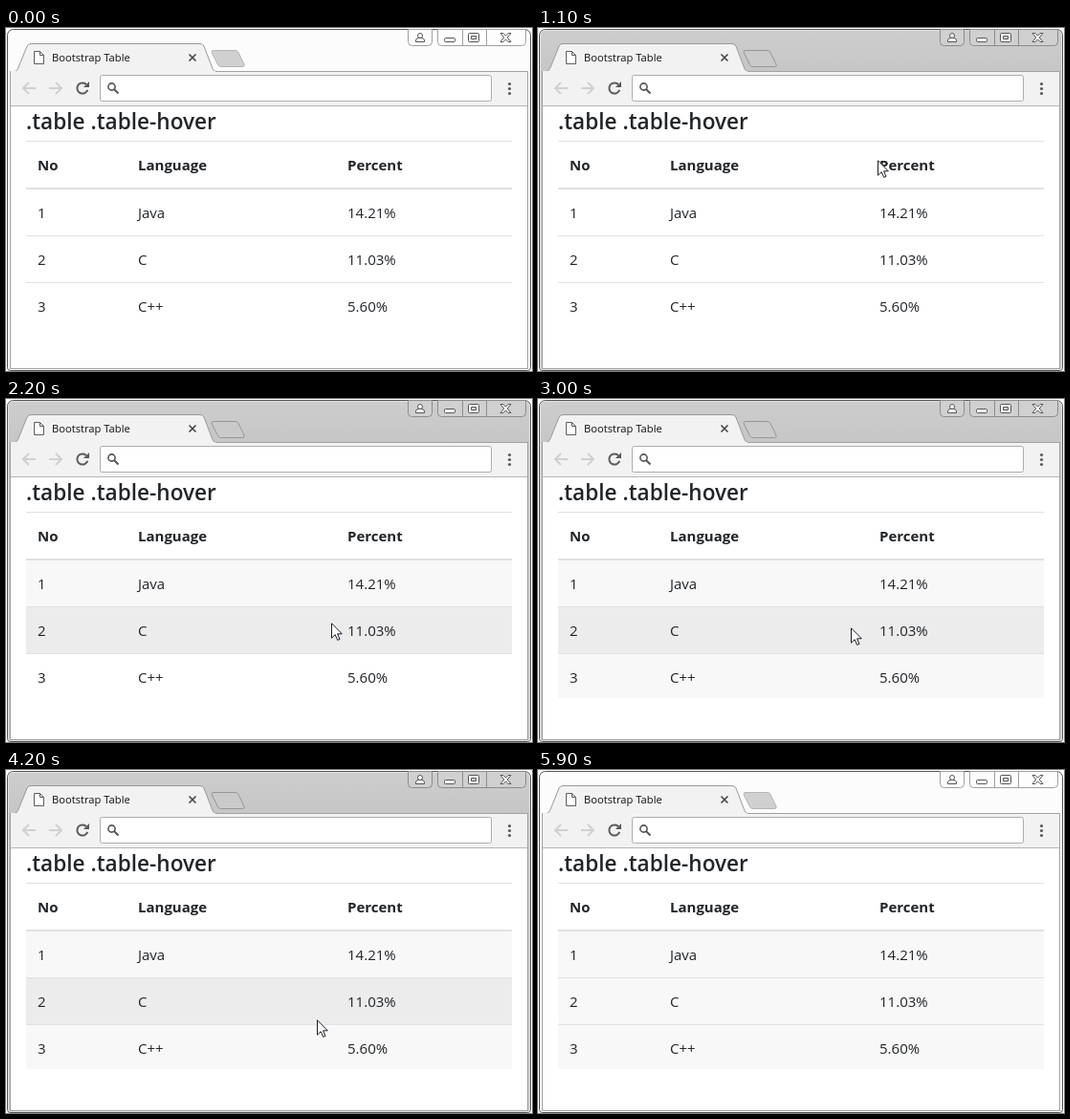
Write an HTML page with a canvas that moves like this. It is 550 px wide and 359 px high and loops after 6000 ms.

```html
<!DOCTYPE html>
<html lang="en">
<head>
<meta charset="utf-8">
<title>Bootstrap Table</title>
<style>
  html, body { margin: 0; width: 100%; height: 100%; overflow: hidden; background: #fff; }
  canvas { display: block; }
</style>
</head>
<body>
<canvas id="stage" width="550" height="359"></canvas>
<script>
const ctx = document.getElementById('stage').getContext('2d');
const LOOP = 6000, STEP = 100, EXIT = 4800;
const FONT = '"Open Sans", "Noto Sans", sans-serif';
const INK = '#212529';

// Pointer poses: time, x, y
const POSES = [
  [400, 490, 86], [500, 401, 122], [600, 372, 132], [700, 358, 137], [800, 355, 138],
  [1600, 355, 138], [1800, 354, 149], [2000, 347, 188], [2200, 340, 234], [2300, 338, 261],
  [2400, 337, 285], [2500, 336, 303], [2600, 335, 310], [2700, 335, 310], [2800, 334, 299],
  [2900, 331, 271], [3000, 327, 239], [3200, 325, 180], [3300, 325, 150], [3400, 325, 134],
  [3500, 325, 126], [3600, 325, 126], [3700, 325, 130], [3900, 325, 160], [4300, 325, 294],
  [4400, 325, 312], [4700, 325, 354]
];

const COLS = [33, 138, 357];
const HEAD = ['No', 'Language', 'Percent'];
const ROWS = [['1', 'Java', '14.21%'], ['2', 'C', '11.03%'], ['3', 'C++', '5.60%']];
const ROW_TOP = 168, ROW_H = 49;

function pointerAt(t) {
  if (t < POSES[0][0] || t >= EXIT) return null;
  const next = POSES.findIndex(p => p[0] > t);
  if (next < 0) return POSES[POSES.length - 1].slice(1);
  const [t0, x0, y0] = POSES[next - 1], [t1, x1, y1] = POSES[next];
  const k = (t - t0) / (t1 - t0);
  return [Math.round(x0 + (x1 - x0) * k), Math.round(y0 + (y1 - y0) * k)];
}

function hoveredRow(t) {
  const p = pointerAt(t);
  return p ? Math.floor((p[1] - ROW_TOP) / ROW_H) : -1;
}

// A row keeps a light tint once it has been hovered
const firstHover = ROWS.map((_, i) => {
  let t = 0;
  while (t < LOOP && hoveredRow(t) !== i) t += STEP;
  return t;
});

function rect(x, y, w, h, fill) {
  ctx.fillStyle = fill;
  ctx.fillRect(x, y, w, h);
}

function paint(fill, stroke, width = 1) {
  if (fill) { ctx.fillStyle = fill; ctx.fill(); }
  if (stroke) { ctx.strokeStyle = stroke; ctx.lineWidth = width; ctx.stroke(); }
}

function shape(d, fill, stroke, width) {
  const path = new Path2D(d);
  if (fill) { ctx.fillStyle = fill; ctx.fill(path); }
  if (stroke) { ctx.strokeStyle = stroke; ctx.lineWidth = width || 1; ctx.stroke(path); }
}

function box(x, y, w, h, r, fill, stroke) {
  ctx.beginPath();
  ctx.roundRect(x, y, w, h, r);
  paint(fill, stroke);
}

function circle(x, y, r, fill, stroke, width) {
  ctx.beginPath();
  ctx.arc(x, y, r, 0, Math.PI * 2);
  paint(fill, stroke, width);
}

function text(str, x, y, size, weight = 400, color = INK) {
  ctx.font = `${weight} ${size}px ${FONT}`;
  ctx.fillStyle = color;
  ctx.fillText(str, x, y);
}

function drawFrame(active) {
  let bar = '#fcfcfc';
  if (active) {
    bar = ctx.createLinearGradient(0, 2, 0, 46);
    bar.addColorStop(0, '#cdcdcd');
    bar.addColorStop(1, '#c6c6c6');
  }
  rect(0, 0, 550, 359, '#fff');
  box(1.5, 1.5, 547, 357, [6, 6, 3, 3], bar, '#555');
  if (active) box(2.5, 2.5, 545, 355, [5, 5, 2, 2], null, '#e2e2e2');
  rect(4, 45, 542, 312, '#a3a3a3');
  rect(5, 46, 540, 35, '#f2f2f2');
  rect(5, 81, 540, 1, '#b5b5b5');
  rect(5, 82, 540, 274, '#fff');
}

function drawControls(active) {
  const fill = active ? '#d0d0d0' : '#fdfdfd', edge = active ? '#8b8b8b' : '#a0a0a0';
  const icon = '#555';
  box(420.5, 1.5, 25, 17, [0, 0, 4, 4], fill, edge);
  box(451.5, 1.5, 92, 17, [0, 0, 4, 4], fill, edge);
  rect(477, 2, 1, 16, edge);
  rect(502, 2, 1, 16, edge);
  shape('M428.5 14.5V13Q428.5 11 431 10.5H435Q437.5 11 437.5 13V14.5Z', '#fff', icon);
  circle(433, 8, 2.5, '#fff', icon);
  box(458.5, 10.5, 11, 4, 1, '#fff', icon);
  box(483.5, 5.5, 11, 9, 1, '#fff', icon);
  box(486.5, 8.5, 5, 3, 0, fill, icon);
  shape('M517 5.5H520L522.5 8.2 525 5.5H528L524.2 10 528 14.5H525L522.5 11.8 520 14.5H517L520.8 10Z',
    '#fff', icon);
}

function drawTab(active) {
  shape('M5 45.5H9Q11.5 45 12.5 42.5L22 19Q23.3 16.5 26 16.5H203Q205.7 16.5 207 19L216 42.5Q217 45 219.5 45.5',
    '#f2f2f2', '#999');
  rect(5, 45, 214, 2, '#f2f2f2');
  shape('M217 23.5H240Q242 23.5 243 25.5L249 38Q249.8 40.5 247.5 40.5H224.5Q222.5 40.5 221.5 38.5L215.3 26Q214.3 23.5 217 23.5Z',
    active ? '#cacaca' : '#d0d0d0', active ? '#969696' : '#b5b5b5');
  shape('M29.5 24.5H35.5L39.5 28.5V37.5H29.5ZM35.5 24.5V28.5H39.5', '#fff', '#5f5f5f');
  text('Bootstrap Table', 48, 35, 11.2, 400, '#111');
  shape('M191.5 27.5L198.5 34.5M198.5 27.5L191.5 34.5', null, '#444', 1.6);
}

function drawToolbar() {
  shape('M31 63H18.5M24 57L18 63 24 69', null, '#d0d0d0', 2);
  shape('M45 63H57.5M52 57L58 63 52 69', null, '#d0d0d0', 2);
  ctx.beginPath();
  ctx.arc(80, 63, 5.6, 0.35, Math.PI * 1.75);
  paint(null, '#5a5a5a', 2);
  shape('M87 56V62H81Z', '#5a5a5a');
  box(98.5, 49.5, 409, 27, 2, '#fff', '#adadad');
  circle(110.5, 61.5, 3.6, null, '#555', 1.6);
  shape('M113 64L117.5 68.5', null, '#555', 2);
  for (const y of [58.5, 63.5, 68.5]) circle(526.5, y, 1.6, '#5a5a5a');
}

function drawTable(t) {
  text('.table .table-hover', 21, 106, 22.6, 600);
  HEAD.forEach((s, c) => text(s, COLS[c], 149, 15, 700));
  const hover = hoveredRow(t);
  ROWS.forEach((row, i) => {
    const y = ROW_TOP + i * ROW_H;
    const fill = hover === i ? '#ececec' : t > firstHover[i] ? '#f8f8f8' : '#fff';
    rect(21, y, 508, i === 2 ? 47 : ROW_H, fill);
    row.forEach((s, c) => text(s, COLS[c], y + 31, 15));
  });
  rect(21, 118, 508, 1, '#dfe1e3');
  rect(21, 167, 508, 2, '#dfe1e3');
  rect(21, 217, 508, 1, '#dfe1e3');
  rect(21, 266, 508, 1, '#dfe1e3');
}

function drawPointer(t) {
  const p = pointerAt(t);
  if (!p) return;
  ctx.save();
  ctx.translate(p[0], p[1]);
  shape('M.5 .8V16.2L4.2 12.7 6.7 18.4 9 17.4 6.6 11.8H11.3Z', '#fff', '#1c1c28');
  ctx.restore();
}

function draw(t) {
  const active = t >= 1100 && t < 5900;
  drawFrame(active);
  drawControls(active);
  drawTab(active);
  drawToolbar();
  drawTable(t);
  drawPointer(t);
}

const start = performance.now();
function tick() {
  const t = (performance.now() - start) % LOOP;
  draw(Math.floor(t / STEP) * STEP);
  requestAnimationFrame(tick);
}
tick();
</script>
</body>
</html>
```
